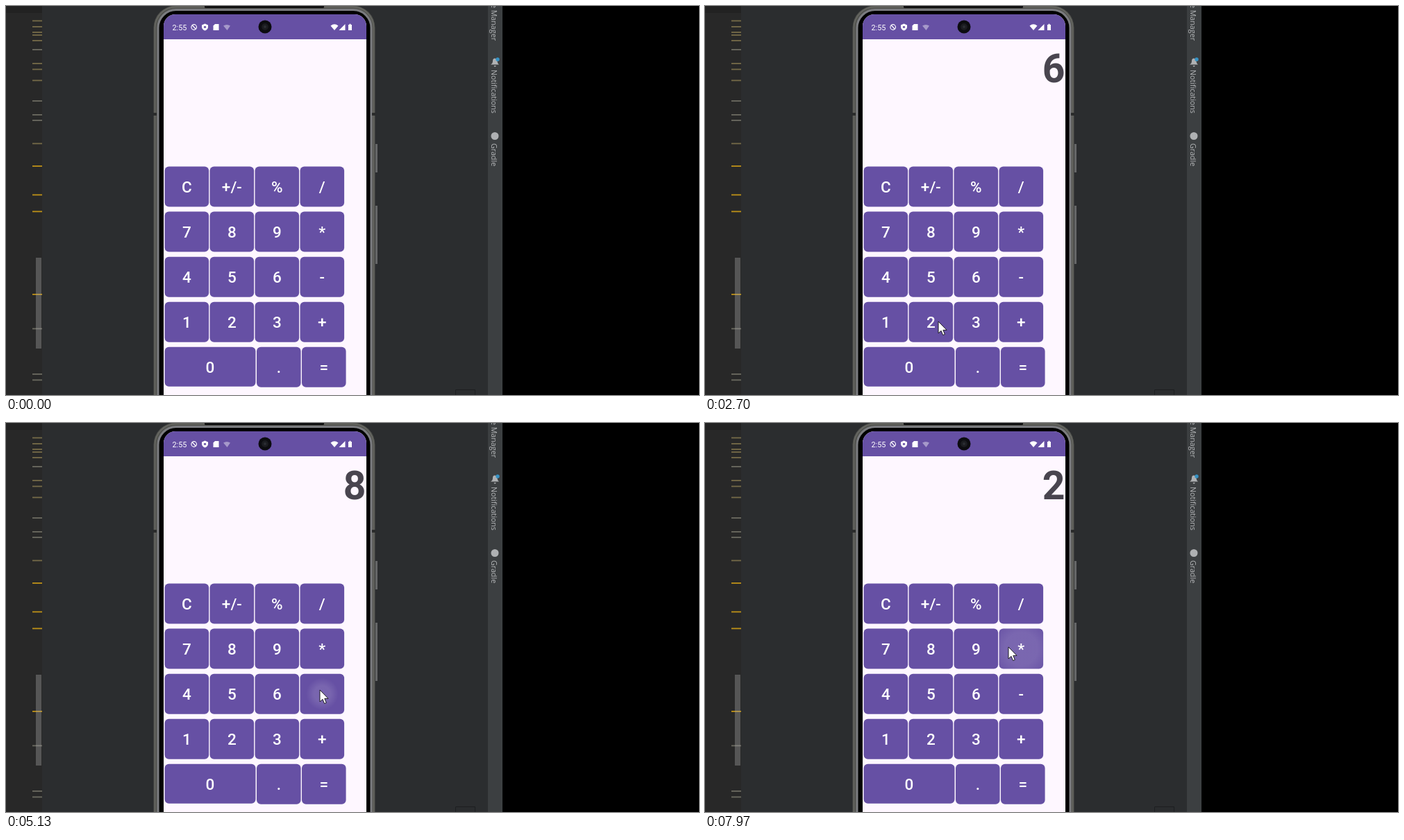
An HTML page that plays this animation: 998 by 561 pixels, repeating every 8 s.

```html
<!DOCTYPE html>
<html lang="en">
<head>
<meta charset="utf-8">
<title>Calculator demo</title>
<style>
  html, body { margin: 0; height: 100%; overflow: hidden; background: #000; }
  svg { display: block; width: 100vw; height: 100vh; }
  .label { font: 500 22.5px Roboto, sans-serif; fill: #fff; text-anchor: middle; }
  .side { font: 10.7px "Open Sans", sans-serif; fill: #b4b6b8; }
</style>
</head>
<body>
<svg viewBox="0 0 998 561">
  <defs>
    <radialGradient id="glow">
      <stop offset=".5" stop-color="#fff"/>
      <stop offset="1" stop-color="#fff" stop-opacity="0"/>
    </radialGradient>
    <clipPath id="keyShape"><rect width="63.6" height="58" rx="6"/></clipPath>
    <clipPath id="screen"><rect x="227" y="12" width="292" height="620" rx="17"/></clipPath>
  </defs>

  <!-- editor -->
  <rect width="715" height="561" fill="#2b2d2f"/>
  <rect width="52" height="561" fill="#282828"/>
  <rect width="52" height="10" fill="#222"/>
  <g id="marks"></g>
  <rect x="43" y="363" width="8" height="131" fill="#a6a6a6" opacity=".36"/>
  <path d="M647.5 561V553.5H675.5V561" fill="#2a2c2e" stroke="#1d1e20"/>
  <rect x="694" width="21" height="561" fill="#3c3f41"/>
  <g class="side">
    <text transform="translate(699 50) rotate(90)" text-anchor="end">Device Manager</text>
    <text transform="translate(699 92) rotate(90)">Notifications</text>
    <text transform="translate(699 198) rotate(90)">Gradle</text>
  </g>
  <path d="M698 84.5Q701 83 701 79Q701 75.5 704 75.5Q707.5 76 707.5 80Q708 83 710 84.5ZM702.5 86H706L704 88Z" fill="#afb1b3"/>
  <circle cx="708" cy="77" r="2.7" fill="#3592c4"/>
  <circle cx="704" cy="187.5" r="5.5" fill="#afb1b3"/>

  <!-- phone -->
  <path d="M532 199h3v41h-3zM532 288h3v84h-3z" fill="#666768"/>
  <rect x="212.5" y="-.5" width="319" height="640" rx="32" fill="#50514d"/>
  <rect x="214.5" y="1.5" width="315" height="640" rx="30" fill="none" stroke="#646560" stroke-width="2"/>
  <rect x="219" y="5.5" width="307" height="640" rx="26" fill="#000" stroke="#7b7c80" stroke-width="3"/>
  <path d="M212 154h5v4h-5zM527 154h5v4h-5z" fill="#2a2b2b"/>
  <path d="M286 0H458V2Q458 3 456 3H288Q286 3 286 2Z" fill="#111"/>
  <g clip-path="url(#screen)">
    <rect x="227" y="12" width="292" height="620" fill="#fef7ff"/>
    <rect x="227" y="12" width="292" height="36" fill="#6650a4"/>
  </g>
  <circle cx="373" cy="30" r="9.5" fill="#0c0c10"/>
  <circle cx="373" cy="30" r="5" fill="#1b1c20"/>
  <circle cx="373" cy="30" r="2" fill="#2b2d33"/>
  <g fill="#fff">
    <text x="239.5" y="34.5" font-family="Roboto, sans-serif" font-size="10.8">2:55</text>
    <path d="M268 27.5L273.5 33.5" stroke="#fff" stroke-width="1.2"/>
    <circle cx="270.7" cy="30.5" r="3.8" fill="none" stroke="#fff" stroke-width="1.2"/>
    <path d="M282 27.5L286.5 25.5L291 27.5V30.5Q290.5 34 286.5 35.5Q282.5 34 282 30.5Z"/>
    <circle cx="286.5" cy="30.3" r="1.6" fill="#6650a4"/>
    <path d="M301 26H306.5V35H298.5V28.5Z"/>
    <path d="M313 28.5Q318 25.5 323 28.5L318.5 35Z" opacity=".42"/>
    <path d="M467.5 28.5Q473 24 478.5 28.5L473 35Z"/>
    <path d="M479.5 35L488.5 26V35Z"/>
    <path d="M493 27H494.5V25.8H496.5V27H498V35H493Z"/>
  </g>
  <text id="display" x="518.5" y="109.5" text-anchor="end" font-family="Roboto, sans-serif" font-size="57" font-weight="700" fill="#49454f"></text>
  <g id="keys"></g>
  <path id="cursor" d="M0 0V17L4 13.4L6.6 19.6L9.3 18.5L6.8 12.4H12Z" fill="#fff" stroke="#111" stroke-width=".9"/>
</svg>
<script>
const LOOP = 8000;
const $ = id => document.getElementById(id);

function add(parent, tag, attrs, text = "") {
  const node = document.createElementNS("http://www.w3.org/2000/svg", tag);
  for (const name in attrs) node.setAttribute(name, attrs[name]);
  node.textContent = text;
  return parent.appendChild(node);
}

function addMarks(color, ys) {
  for (const y of ys) add($("marks"), "rect", { x: 38, y: y - 1, width: 14, height: 1.8, fill: color });
}
addMarks("#756a48", [21.5, 30, 38, 42, 50, 83, 91.5, 107.5, 198.5]);
addMarks("#6b6a60", [63, 137, 157, 165, 465.5, 531, 539.5]);
addMarks("#be9117", [231, 272.5, 296.5, 416]);

const ripples = {};
function addKey(label, x, y, width = 63.6, height = 58) {
  const key = add($("keys"), "g", { transform: `translate(${x} ${y})` });
  add(key, "rect", { width, height, rx: 6, fill: "#6650a4" });
  const clip = add(key, "g", { "clip-path": "url(#keyShape)" });
  ripples[label] = add(clip, "circle", { cx: 31.8, cy: 29, fill: "url(#glow)", opacity: 0 });
  add(key, "text", { class: "label", x: width / 2, y: 37.5 }, label);
}
["C +/- % /", "7 8 9 *", "4 5 6 -", "1 2 3 +"].forEach((row, r) =>
  row.split(" ").forEach((label, c) => addKey(label, 228.5 + c * 65, 231.5 + r * 65.1)));
addKey("0", 228.5, 491.7, 131, 57);
addKey(".", 361, 491.7);
addKey("=", 426, 491.7);

// key, press time, display afterwards
const presses = [
  ["6", 1150, "6"], ["+", 1860, "6"], ["2", 2950, "2"], ["=", 3580, "8"],
  ["-", 5060, "8"], ["6", 5540, "6"], ["=", 6600, "2"], ["*", 7770, "2"]
];

// time, x, y of the pointer tip
const path = [
  [60, 430, 575], [900, 394, 391], [1300, 394, 391], [1800, 459, 454], [2100, 459, 454],
  [2800, 329, 455], [3080, 329, 455], [3450, 455, 509], [3900, 455, 509], [4850, 452, 385],
  [5180, 452, 385], [5480, 393, 389], [5720, 393, 389], [5970, 405, 425], [6420, 459, 502],
  [7250, 459, 502], [7700, 437, 323], [8000, 437, 323]
];

function pointerAt(t) {
  const i = Math.max(1, path.findIndex(p => p[0] > t));
  const [t0, x0, y0] = path[i - 1], [t1, x1, y1] = path[i];
  const u = Math.min(1, Math.max(0, (t - t0) / (t1 - t0)));
  const e = u * u * (3 - 2 * u);
  return [x0 + (x1 - x0) * e, y0 + (y1 - y0) * e];
}

function draw(t) {
  let shown = "";
  for (const label in ripples) ripples[label].setAttribute("opacity", 0);
  for (const [label, start, value] of presses) {
    const age = t - start;
    if (age >= 80) shown = value;
    if (age < 0 || age > 620) continue;
    const fade = Math.min(1, age / 75, (620 - age) / 150);
    ripples[label].setAttribute("r", 10 + 75 * Math.min(1, age / 400));
    ripples[label].setAttribute("opacity", 0.13 * fade);
  }
  $("display").textContent = shown;
  $("cursor").setAttribute("transform", `translate(${pointerAt(t)})`);
}

function tick() {
  draw(performance.now() % LOOP);
  requestAnimationFrame(tick);
}
tick();
</script>
</body>
</html>
```
